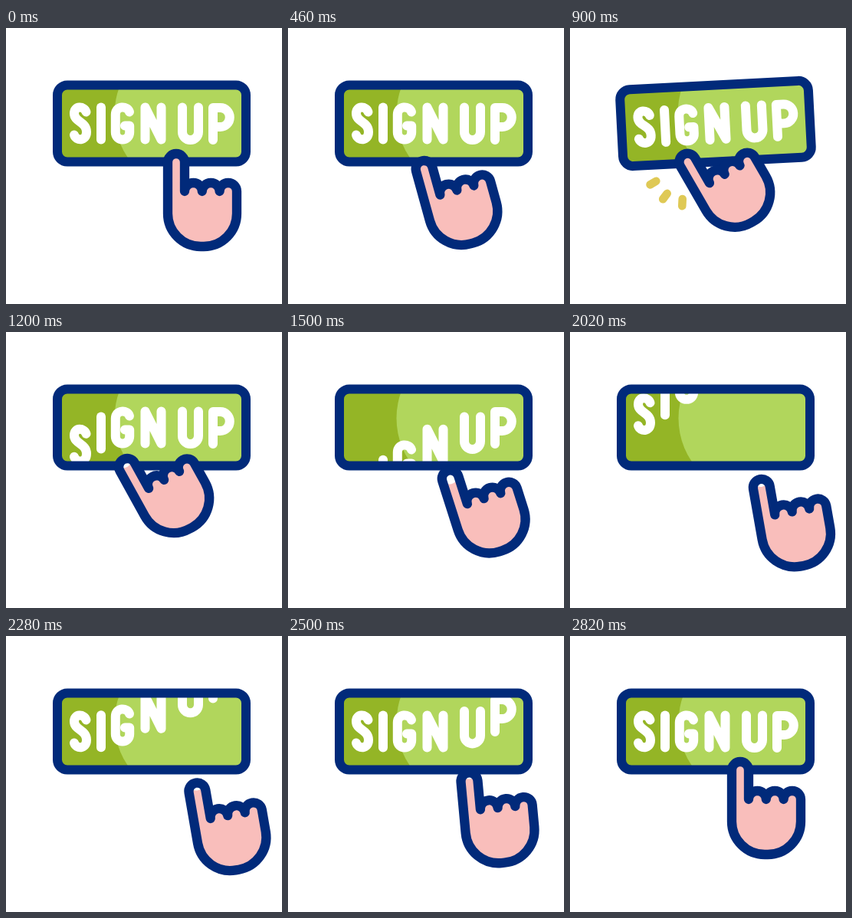
An HTML page with a canvas for the animation above (3000 ms loop, 360 by 360 pixels).

```html
<!DOCTYPE html>
<html lang="en">
<head>
<meta charset="utf-8">
<title>Sign up</title>
<style>
  html, body { margin: 0; width: 100%; height: 100%; overflow: hidden; background: #fff; }
  canvas { display: block; width: 360px; height: 360px; }
</style>
</head>
<body>
<canvas id="stage" width="360" height="360" role="img" aria-label="SIGN UP"></canvas>
<script>
const ctx = document.getElementById('stage').getContext('2d');
const LOOP = 3000;
const NAVY = '#012a7a', LIGHT = '#b1d65c', DARK = '#94b526', PINK = '#f9bebb', YELLOW = '#dfc955';

const LETTERS = [
  'M104.5 109.5C102 101.5 89 101 89 111.5C89 123 105 122 105 135.5C105 148 91.5 147.5 89 139.5',
  'M124 103.5V145.5',
  'M161 109.5C158.5 101 142.8 101 142.8 113V136C142.8 148.5 161.2 148.5 161.2 136V127.5H155',
  'M181.5 145.5V103.5L202.5 145.5V103.5',
  'M230 103.5V135.5A10.5 10.5 0 0 0 251 135.5V103.5',
  'M270 146V104H279.5A12.3 12.5 0 0 1 279.5 129H270'
].map(d => new Path2D(d));

// Hand outline, centred on the palm.
const hand = new Path2D(
  'M-45 -65A11 11 0 0 1 -23 -65V-27A11.4 11 0 0 1 -.2 -27A11.4 11 0 0 1 22.6 -27' +
  'A11.2 11 0 0 1 45 -27V2A43 43 0 0 1 2 45H-2A43 43 0 0 1 -45 2Z');

const button = new Path2D();
button.roundRect(67, 74.5, 246, 100, 13);
const face = new Path2D();
face.roundRect(71, 79, 238, 91, 7);

const sparks = [[108.5, 202, -.85, .5], [124, 219.5, -.6, .8], [146.5, 227.5, -.05, 1]];

// Hand poses: time, x, y, degrees.
const poses = [
  [220, 256, 240, 0],
  [600, 216, 236.5, -22],
  [860, 215.4, 214, -30],
  [1100, 215.4, 214, -30],
  [1800, 294.6, 261, -10],
  [2240, 294.6, 261, -10],
  [2780, 256, 240, 0]
];

const progress = (t, start, end) => Math.min(1, Math.max(0, (t - start) / (end - start)));
const ease = u => (1 - Math.cos(Math.PI * u)) / 2;
const easeBetween = (t, start, end) => ease(progress(t, start, end));

function poseAt(t) {
  let pose = poses[0].slice(1);
  for (let i = 1; i < poses.length; i++) {
    const k = easeBetween(t, poses[i - 1][0], poses[i][0]);
    pose = pose.map((v, j) => v + (poses[i][j + 1] - v) * k);
  }
  return pose;
}

function stroke(path, color, width) {
  ctx.strokeStyle = color;
  ctx.lineWidth = width;
  ctx.stroke(path);
}

function rotate(degrees) {
  ctx.rotate(degrees * Math.PI / 180);
}

function drawLetters(t) {
  const travel = 77, stagger = 100, duration = 570;
  LETTERS.forEach((path, i) => {
    const out = 990 + i * stagger, back = 1630 + i * stagger;
    const y = t < back
      ? travel * easeBetween(t, out, out + duration)
      : travel * (easeBetween(t, back, back + duration) - 1);
    ctx.save();
    ctx.translate(0, y);
    stroke(path, '#fff', 12);
    ctx.restore();
  });
}

function drawButton(t) {
  ctx.save();
  ctx.translate(190, 124.5);
  rotate(-5.8 * Math.sin(2 * Math.PI * progress(t, 760, 1100)));
  ctx.translate(-190, -124.5);
  ctx.save();
  ctx.clip(face);
  ctx.fillStyle = DARK;
  ctx.fillRect(60, 70, 260, 110);
  ctx.fillStyle = LIGHT;
  ctx.fillRect(242, 70, 80, 110);
  ctx.beginPath();
  ctx.arc(242.5, 112.5, 101, 0, 2 * Math.PI);
  ctx.fill();
  drawLetters(t);
  ctx.restore();
  stroke(button, NAVY, 12);
  ctx.restore();
}

function drawSparks(t) {
  const u = progress(t, 800, 1000);
  if (u <= 0 || u >= 1) return;
  const half = 4.6 * Math.sin(Math.PI * u), shift = (u - .5) * 18;
  for (const [x, y, dx, dy] of sparks) {
    const dash = new Path2D();
    dash.moveTo(x + dx * (shift - half), y + dy * (shift - half));
    dash.lineTo(x + dx * (shift + half), y + dy * (shift + half));
    stroke(dash, YELLOW, 10.6 * Math.min(1, 4 * u, 4 * (1 - u)));
  }
}

function drawHand(t) {
  const [x, y, angle] = poseAt(t);
  const leave = progress(t, 1100, 1800);
  const tip = 10 * Math.sin(Math.PI * leave) + 4 * leave * (1 - easeBetween(t, 2240, 2780));
  ctx.save();
  ctx.translate(x, y);
  rotate(angle);
  ctx.fillStyle = PINK;
  ctx.fill(hand);
  if (tip > .1) {
    ctx.save();
    ctx.clip(hand);
    ctx.fillStyle = '#fff';
    ctx.beginPath();
    ctx.roundRect(-45, -80, 22, 10 + tip, [0, 0, 11, 11]);
    ctx.fill();
    ctx.restore();
  }
  stroke(hand, NAVY, 12.3);
  ctx.restore();
}

function draw(t) {
  ctx.fillStyle = '#fff';
  ctx.fillRect(0, 0, 360, 360);
  ctx.lineCap = ctx.lineJoin = 'round';
  drawButton(t);
  drawSparks(t);
  drawHand(t);
}

const start = performance.now();
function tick() {
  draw((performance.now() - start) % LOOP);
  requestAnimationFrame(tick);
}
tick();
</script>
</body>
</html>
```
